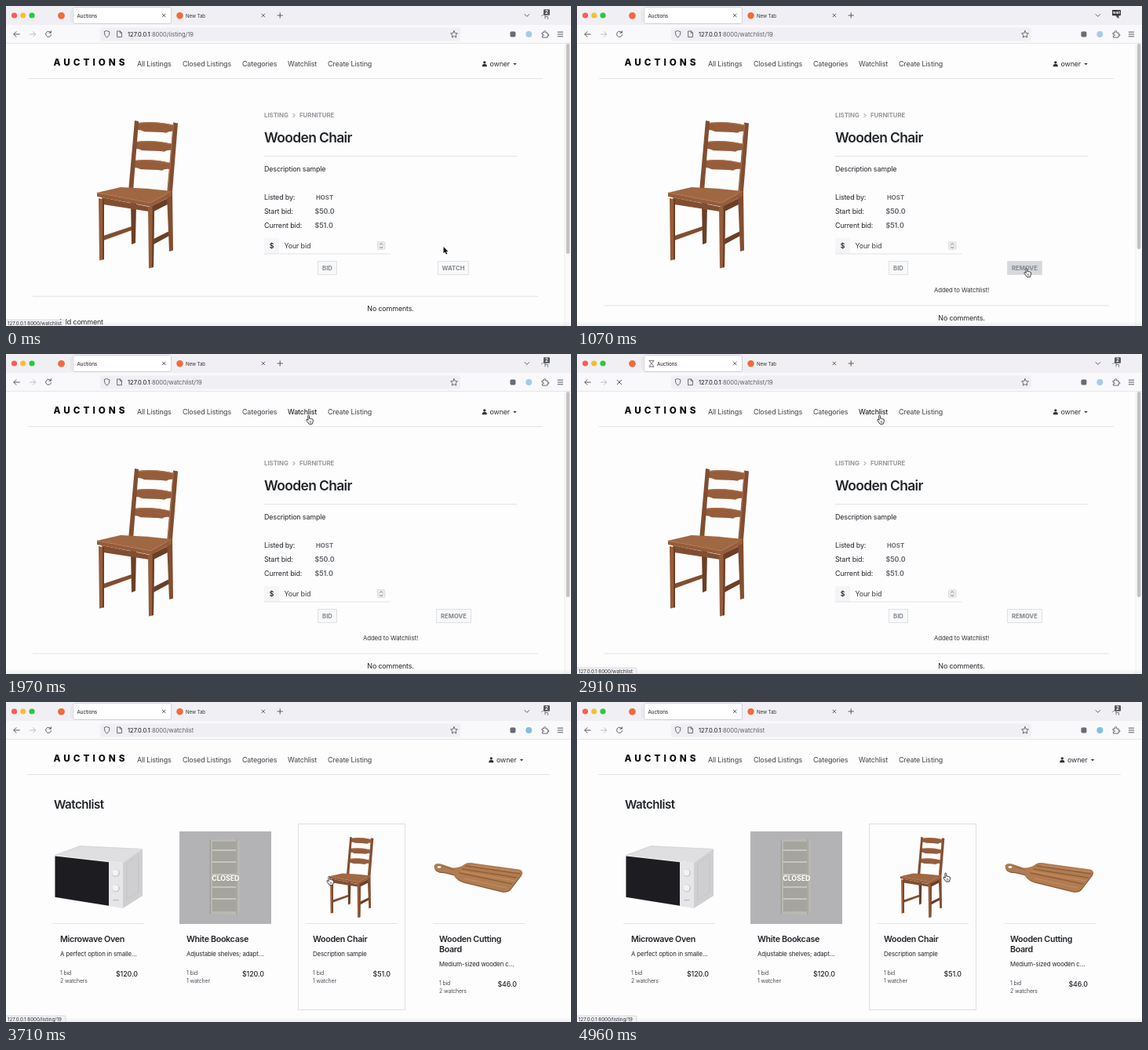
Animation, 720 px wide and 408 px high, one loop 5.03 s. Source, as an HTML page:

```html
<!DOCTYPE html>
<html lang="en">
<head>
<meta charset="utf-8">
<title>Auctions</title>
<style>
  html, body { margin: 0; width: 100%; height: 100%; overflow: hidden; background: #fdfdfe; }
  svg { display: block; width: 100%; height: 100%; font-family: Inter, "Open Sans", sans-serif; }
  text { white-space: pre; }
</style>
</head>
<body>
<svg id="stage" viewBox="0 0 720 408" xmlns="http://www.w3.org/2000/svg"></svg>
<script>
const LOOP = 5030;
const stage = document.getElementById('stage');

// Markup helpers
const attrs = o => Object.entries(o).map(([k, v]) => ` ${k}="${v}"`).join('');
const text = (x, y, s, size = 8.95, o = {}) =>
  `<text${attrs({ x, y, 'font-size': size, fill: '#212529', 'letter-spacing': '-.0185em', ...o })}>${s}</text>`;
const rect = (x, y, width, height, fill, o = {}) => `<rect${attrs({ x, y, width, height, fill, ...o })}/>`;
const dot = (cx, cy, r, fill, o = {}) => `<circle${attrs({ cx, cy, r, fill, ...o })}/>`;
const fill = (d, color, o = {}) => `<path${attrs({ d, fill: color, ...o })}/>`;
const line = (d, stroke = '#4a4a52', width = .9, o = {}) =>
  `<path${attrs({ d, fill: 'none', stroke, 'stroke-width': width, 'stroke-linecap': 'round', 'stroke-linejoin': 'round', ...o })}/>`;
const rule = (x1, x2, y) => line(`M${x1} ${y}H${x2}`, '#e2e3e5', 1, { 'stroke-linecap': 'butt' });
const group = (id, body, o = {}) => `<g${attrs({ id, ...o })}>${body}</g>`;
const cross = (x, y, r) => line(`M${x - r} ${y - r}l${2 * r} ${2 * r}m0 ${-2 * r}l${-2 * r} ${2 * r}`);
const mid = { 'text-anchor': 'middle' };
const bold = { 'font-weight': 700, 'letter-spacing': 0 };
const semi = { 'font-weight': 600, 'letter-spacing': '-.032em' };

function browser() {
  const brand = '#f26a3d';
  return rect(0, 0, 720, 24, '#f0f0f4') + rect(0, 24, 720, 23, '#f9f9fb') + rect(0, 47, 720, 1, '#e6e6e9') +
    dot(10.5, 12, 3.6, '#fc5b57') + dot(21.7, 12, 3.6, '#fdbc2e') + dot(33, 12, 3.6, '#29c840') +
    dot(70.5, 12.3, 4.4, brand) + line('M83 5V20', '#d2d2d8', .7) +
    rect(85.5, 1.5, 125, 21, '#fff', { rx: 2.5, stroke: '#cdcdd6', 'stroke-width': .9 }) +
    group('hourglass', line('M92 8.3h6M92 16.2h6M92.9 8.5v1.5l2.1 2.2-2.1 2.2v1.6M97.1 8.5v1.5L95 12.2l2.1 2.2v1.6', '#55555d', .8)) +
    group('tabTitle', text(0, 14.5, 'Auctions', 6.3, { fill: '#15141a', 'letter-spacing': '-.01em' })) +
    cross(201.2, 12, 1.9) + dot(221.5, 12.3, 4.2, brand) +
    text(229, 14.5, 'New Tab', 6.2, { fill: '#33333a' }) + cross(327.8, 12, 1.9) +
    line('M346 12h6.4M349.2 8.8v6.4') + line('M661 10.6l2.8 2.8 2.8-2.8') +
    group('count', line('M682.5 12.5q2-2 4.5-1.5v5M687 13.5h3.5v3', '#77777f', .9) +
      rect(685, 4.2, 8, 7.6, '#55555c', { rx: 1 }) + text(689, 10.3, '2', 6, { ...mid, ...bold, fill: '#fff' })) +
    group('wait', fill('M686 11.5h4.5v4.5l-2-1z', '#55555c') + rect(682, 5, 11, 7.3, '#36363c', { rx: .8 }) +
      text(687.5, 10.2, 'wait', 4.6, { ...mid, ...bold, fill: '#fff' })) +
    line('M10 36h7.3M13 32.7L9.8 36l3.2 3.3') +
    line('M30.4 36h7.3M34.6 32.7l3.2 3.3-3.2 3.3', '#b9b9c0') +
    group('reload', line('M57 33.7a3.5 3.5 0 1 0 .6 3M57.4 31.8v2.4h-2.5')) +
    group('stop', cross(54, 36, 2.8)) +
    rect(120, 27.5, 459, 17, '#f0f0f4', { rx: 2.5 }) +
    line('M128.6 31.7l3.4 1.2q.2 5-3.4 7.4-3.6-2.4-3.4-7.4z', '#4a4a52', .8) +
    line('M142 32h3.4l2 2v5.6H142zM145.3 32v2.2h2', '#4a4a52', .8) +
    `<text id="url" x="155" y="38.6" font-size="7.55" fill="#15141a">127.0.0.1<tspan id="path" fill="#5e5e67"></tspan></text>` +
    line('M571 31.7l1.3 2.8 3.1.4-2.3 2.1.6 3.1-2.7-1.5-2.7 1.5.6-3.1-2.3-2.1 3.1-.4z', '#4a4a52', .8) +
    rect(642.4, 32.4, 7, 7, '#6b6b74', { rx: 1.6 }) + dot(666.3, 36, 4, '#8fbfe8', { id: 'addon' }) +
    line('M683.4 34h2.2q-.7-2.5 1-2.5t1 2.5h2.4v2.2q2-.7 2 .8t-2 .9v2.2h-6.6v-2q2 .2 2-1t-2-1z', '#4a4a52', .8) +
    line('M703.2 33.2h6.4M703.2 36h6.4M703.2 38.8h6.4');
}

function nav() {
  const links = [[167, 'All Listings'], [225, 'Closed Listings'], [301, 'Categories'], [359, 'Watchlist'], [410, 'Create Listing']];
  return text(60.6, 76, 'AUCTIONS', 11.7, { 'font-weight': 800, 'letter-spacing': 4, fill: '#0c0c0e' }) +
    links.map(([x, s]) => text(x, 77.1, s, 8.95, { fill: '#3f4246', id: s.split(' ')[0] })).join('') +
    group('account', dot(609.8, 71.9, 1.7, '#303338') + fill('M606.7 77.2q0-3.2 2.4-3.2h1.4q2.4 0 2.4 3.2z', '#303338') +
      text(616.5, 77.1, 'owner', 8.95, { fill: '#303338' }) + fill('M646.2 72.9h4.6l-2.3 2.4z', '#303338'));
}

function chair() {
  const wood = '#965d3a', light = '#9f6843', shade = '#824e30', dark = '#6b3f26';
  const slat = (x, y, w) => fill(`M${x} ${y}q${w / 2}-3 ${w} 3l-.6 8q-7-.8-10 1.8-11-1.5-${w - 20}-1.5-4-2.6-10.6-2.5z`, wood) +
    line(`M${x + .5} ${y + .6}q${w / 2}-3 ${w - 1} 3`, '#b47d57', .8);
  return fill('M159 250l7 2-1 50-5 2z', dark) + fill('M124 293l36-12v5l-36 13z', shade) +
    fill('M188 297l20-10v6l-20 11z', dark) +
    fill('M122 244l60 12v6l-58-9z', shade) + fill('M188 254l20-10v8l-20 10z', dark) +
    slat(167, 149, 48) + slat(164.5, 173, 48) + slat(162.5, 197, 47) +
    fill('M164 146l5 1-7 89h-6z', shade) +
    fill('M213 148.5l6 1-7 87 1 75-5 1.5-3-73z', shade) + line('M213.5 150l-7 86', '#b07a56', .9) +
    fill('M116 238l30-7q33 1 65 5l-27 15z', light) + fill('M116 238l68 13 27-15v6l-26 14-69-13z', wood) +
    line('M116 238l68 13 27-15', '#b07a56', .6) +
    fill('M118 245l7 1.5v76.5l-6 1.5z', wood) + fill('M123 246l2 .5v76.5l-2 .5z', dark) +
    fill('M181 256l8-2-1 79-6 1.5z', wood) + fill('M186.5 255l2.5-1-1 79-2 .5z', dark);
}

function listing() {
  const label = (x, y, s, o = {}) => text(x, y, s, 7.8, { ...bold, fill: '#96999d', ...o });
  const row = (y, k, v, x, size) => text(329, y, k) + text(x, y, v, size, { ...bold, fill: '#686c71' });
  const button = (x, w, s) => rect(x, 325.5, w, 17, '#f8f9fa', { stroke: '#dcdde0', 'stroke-width': .9 }) +
    text(x + w / 2, 337, s, 7.7, { ...bold, ...mid, fill: '#85888d' });
  return rule(28, 684, 92.5) + chair() +
    label(329, 142, 'LISTING') + line('M366 137.4l2 2.1-2 2.1', '#85888d', 1) + label(374, 142, 'FURNITURE') +
    text(329, 173.7, 'Wooden Chair', 17.4, { ...semi, 'letter-spacing': '-.035em' }) + rule(329, 651, 191.5) +
    text(329, 211, 'Description sample') +
    row(247, 'Listed by:', 'HOST', 395, 7.8) + row(265, 'Start bid:', '$50.0', 393.5, 8.7) + row(283, 'Current bid:', '$51.0', 393.5, 8.7) +
    rect(329, 296, 19, 20, '#f5f5f7') + text(338.6, 309, '$', 8.7, { ...mid, 'font-weight': 600 }) +
    text(354.5, 309, 'Your bid', 8.95, { fill: '#3b3e42' }) + rule(329, 490, 316) +
    rect(473.5, 300.5, 9.5, 10, '#ececee', { rx: 1.5, stroke: '#d4d4d6', 'stroke-width': .6 }) +
    line('M476.6 304.2l1.6-1.7 1.6 1.7M476.6 307.2l1.6 1.7 1.6-1.7', '#66666c', .8) +
    button(397.5, 24, 'BID') + group('watch', button(550.5, 39, 'WATCH')) + group('remove', button(548.5, 44, 'REMOVE')) +
    group('added', text(490, 365, 'Added to Watchlist!', 7.8, { ...mid, 'letter-spacing': '-.01em', fill: '#33363a' })) +
    group('comments', rule(34, 678, 370.2) + text(490, 389.2, 'No comments.', 8.95, mid) + text(66.5, 406.2, 'Add comment')) +
    rect(712, 48, 8, 360, '#fafafa') + rect(711.6, 48, .7, 360, '#ececec') +
    rect(713.8, 48, 4.6, 268, '#c2c2c4', { id: 'thumb', rx: 2.3 });
}

function microwave() {
  return fill('M62 195l32-12 80 4-25 18z', '#dfdfe1') + fill('M149 205l25-18v60l-25 16z', '#cfcfd2') +
    line('M154 206l15-11v47l-15 10z', '#c0c0c4', .7) + line('M64 195l31-11 75 3.5', '#d2d2d6', .6) +
    fill('M62 195l87 10v58l-87-14z', '#e6e6e8') + fill('M62.5 196.5l68.5 7.7v55.6l-68.5-11z', '#1d1c20') +
    [218, 237.5].map(y => dot(140, y, 5, '#cacace') + dot(139.4, y - .5, 4, '#f3f3f4')).join('') +
    rect(136.5, 252, 7, 1.2, '#b6b6bb');
}

function bookcase() {
  const shelves = [188, 203, 219, 235, 250].map(y => rect(263, y, 30, 2, '#c6c5c0')).join('');
  return rect(221, 165, 117, 118, '#b3b2b4') + fill('M260 176l34-1.5 4 2v92l-4 3.5-34-2z', '#b9b8b3') +
    rect(263, 178, 30, 89, '#a5a49e') + shelves + line('M294 175v96M260.3 176v94', '#94938d', .8) +
    text(279.8, 227.8, 'CLOSED', 8.8, { ...mid, 'font-weight': 700, 'letter-spacing': '-.01em', fill: '#fff' });
}

function board() {
  const body = 'M545.5 209q2-5 10.5-2l13 4.5q10 0 16-5 4-2.5 14-.5l55 7.5q6 1.5 2.5 7l-13 17q-4 5.5-13 3.5l-47-11.5q-9-2.5-13-9.5l-12-3q-12.5.5-13-8z';
  return fill(body, '#855635', { transform: 'translate(.3 1.2)' }) + fill(body, '#b17c50') +
    line('M586 209l69 10M582 213l69 11M578 218l67 14', '#925f39', 1.4) +
    line('M592 208l62 8.5M580 216l68 12M584 225l54 12', '#c69669', .8) + line('M556 209l15 5', '#8f5f3a', .9) +
    `<ellipse cx="552" cy="210.5" rx="3" ry="1.9" fill="#fdfdfe" stroke="#855635" stroke-width=".8"/>`;
}

function card(x, title, about, watchers, price, right) {
  const drop = 13.5 * (title.length - 1);
  const small = (y, s) => text(x, y + drop, s, 6.9, { fill: '#4a4d52' });
  return title.map((s, i) => text(x, 305.5 + 13.5 * i, s, 10.7, { ...semi, 'letter-spacing': '-.03em' })).join('') +
    text(x, 323.6 + drop, about, 7.8, { 'letter-spacing': '-.015em' }) +
    small(347.7, '1 bid') + small(357.9, watchers) +
    text(right, 349.7 + drop, price, 8.9, { 'font-weight': 500, 'text-anchor': 'end', 'letter-spacing': '-.01em' });
}

function watchlist() {
  return rule(27, 693, 92.5) + text(61, 135.5, 'Watchlist', 15.1, semi) +
    rect(372.5, 155.5, 136, 237, 'none', { id: 'frame', stroke: '#dfdfe2' }) +
    rule(59, 176, 282.5) + rule(382, 499, 282.5) + rule(544, 661, 282.5) +
    microwave() + bookcase() + board() +
    group('smallChair', chair(), { transform: 'translate(412 172) scale(.547) translate(-116 -146)' }) +
    card(69, ['Microwave Oven'], 'A perfect option in smalle…', '2 watchers', '$120.0', 168) +
    card(230, ['White Bookcase'], 'Adjustable shelves; adapt…', '1 watcher', '$120.0', 329) +
    card(391, ['Wooden Chair'], 'Description sample', '1 watcher', '$51.0', 490) +
    card(552, ['Wooden Cutting', 'Board'], 'Medium-sized wooden c…', '2 watchers', '$46.0', 651);
}

const tip = 'M0 0v8.3l1.9-1.7 1.4 3 1.5-.7-1.4-2.9h2.5z';
const arrow = line(tip, '#fff', 1.2) + fill(tip, '#111');
const hand = fill('M-.9.9q0-1.2.9-1.2t1 1.2l.2 3q1.1-.6 1.6.3 1-.5 1.6.4 1.4-.3 1.5 1.2l-.3 2.2-1 2.8H.6L-2.2 7q-1.2-1.5-.3-2t2.1 1z', '#fff',
  { stroke: '#17171a', 'stroke-width': .85, 'stroke-linejoin': 'round' }) + line('M1.5 7v2M3 7v2', '#17171a', .5);

stage.innerHTML = `<defs><linearGradient id="shade" x2="0" y2="1">
    <stop stop-opacity="0"/><stop offset="1" stop-opacity=".06"/></linearGradient></defs>` +
  rect(0, 0, 720, 408, '#fdfdfe') +
  group('listing', listing()) + group('list', watchlist()) + nav() + browser() +
  rect(0, 402, 720, 6, 'url(#shade)') +
  group('status', rect(-1, 400, 77, 9, '#f1f1f4', { id: 'statusBox', rx: 1.5, stroke: '#cfcfd4', 'stroke-width': .7 }) +
    text(2, 406.8, '', 6.2, { id: 'statusText', fill: '#2b2a33', 'letter-spacing': 0 })) +
  group('cursor', group('arrow', arrow) + group('hand', hand));

// Pointer path: time, x, y
const route = [
  [0, 557.5, 307], [30, 557.5, 307], [210, 573, 335], [1060, 573, 335], [1240, 527, 270], [1410, 465, 173.5],
  [1570, 424, 111], [1600, 422, 109], [1970, 385.5, 78.5], [3260, 385.5, 78.5], [3330, 391.8, 87],
  [3600, 407, 185], [3840, 417, 247], [4130, 432, 178], [4370, 477, 218.5], [4430, 478, 218.5],
  [4680, 478, 218.5], [4750, 469.7, 218.3], [LOOP, 469.7, 218.3]
];

function slope(i, k) {
  const a = route[i - 1], b = route[i], c = route[i + 1];
  if (!a || !c || a[k] === b[k] || b[k] === c[k]) return 0;
  return (c[k] - a[k]) / (c[0] - a[0]);
}

function pointer(t) {
  const i = Math.max(0, route.findIndex(p => p[0] > t) - 1);
  const a = route[i], b = route[i + 1], d = b[0] - a[0], u = (t - a[0]) / d;
  const u2 = u * u, u3 = u2 * u;
  return [1, 2].map(k => (2 * u3 - 3 * u2 + 1) * a[k] + (3 * u2 - 2 * u3) * b[k] +
    d * ((u3 - 2 * u2 + u) * slope(i, k) + (u3 - u2) * slope(i + 1, k)));
}

const el = id => document.getElementById(id);
const show = (id, on) => el(id).setAttribute('display', on ? 'inline' : 'none');
const set = (id, k, v) => el(id).setAttribute(k, v);
const within = (t, a, b) => t >= a && t < b;
const inside = ([x, y], l, t, r, b) => x > l && x < r && y > t && y < b;

function statusAt(t) {
  if (t < 210) return [':8000/watchlist', 77, Math.min(1, (210 - t) / 150)];
  if (within(t, 530, 940)) return ['', 137, 1];
  if (within(t, 2130, 3470)) return [':8000/watchlist', 77, Math.min(1, (t - 2100) / 110)];
  if (t >= 3600) return [':8000/listing/19', 77, Math.min(1, (t - 3570) / 110)];
  return ['', 77, 0];
}

function draw(t) {
  const saved = t >= 600, onList = t >= 3180;
  const loading = within(t, 515, 900) || within(t, 2830, 3300);
  const waiting = within(t, 580, 1150) || within(t, 3060, 3500);
  const at = pointer(t);
  const overButton = !onList && inside(at, 548, 325, 593, 343);
  const overLink = inside(at, 355, 62, 401, 92);
  const overCard = onList && inside(at, 372, 155, 509, 393);
  const over = overButton || overLink || overCard;

  show('listing', !onList);
  show('list', onList);
  show('watch', !saved);
  show('remove', saved);
  show('added', saved);
  set('comments', 'transform', `translate(0 ${saved ? 11.8 : 0})`);
  set('thumb', 'height', saved ? 262 : 268);
  set('account', 'transform', `translate(${onList ? 8.5 : 0} 0)`);
  set('addon', 'fill', onList ? '#7fc0e6' : '#a3cdea');

  const pressed = within(t, 370, 515);
  for (const id of ['watch', 'remove'])
    el(id).firstChild.setAttribute('fill', !overButton ? '#f8f9fa' : pressed ? '#c9cbce' : '#d6d8db');
  set('Watchlist', 'fill', overLink ? '#050506' : '#3f4246');
  show('frame', overCard);

  show('hourglass', loading);
  set('tabTitle', 'transform', `translate(${loading ? 102 : 90.5} 0)`);
  show('stop', loading);
  show('reload', !loading);
  show('wait', waiting);
  show('count', !waiting);
  el('path').textContent = ':8000/' + (onList ? 'watchlist' : saved ? 'watchlist/19' : 'listing/19');

  const [path, width, alpha] = statusAt(t);
  set('status', 'opacity', alpha);
  set('statusBox', 'width', width);
  el('statusText').textContent = '127.0.0.1' + path;

  set('cursor', 'transform', `translate(${at[0].toFixed(2)} ${at[1].toFixed(2)})`);
  show('hand', over);
  show('arrow', !over);
}

let start;
function tick(now) {
  start ??= now;
  draw((now - start) % LOOP);
  requestAnimationFrame(tick);
}
draw(0);
requestAnimationFrame(tick);
</script>
</body>
</html>
```
